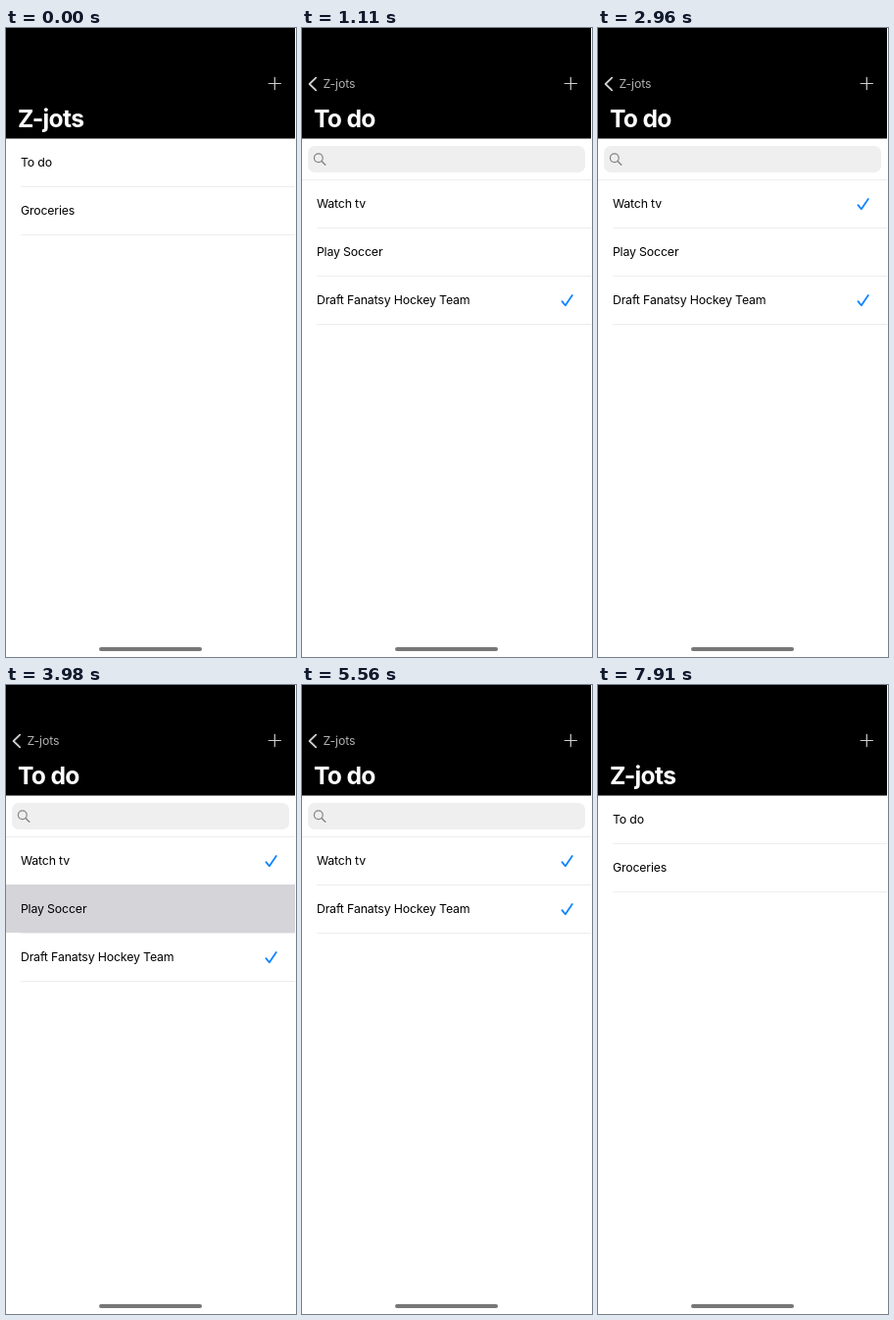
These frames come from a looping animation (296x640 px, 8 s). An HTML page with a canvas:

```html
<!DOCTYPE html>
<html lang="en">
<head>
<meta charset="utf-8">
<title>List app</title>
<style>
html, body { margin: 0; width: 100%; height: 100%; overflow: hidden; background: #fff; }
canvas { display: block; width: 296px; height: 640px; }
</style>
</head>
<body>
<canvas id="stage"></canvas>
<script>
const STAGE = 296, W = 295, H = 640, LOOP = 8000, HEAD = 112.5, ROW = 49;
const APP = 'Z-jots', LIST = 'To do';
const FAMILY = 'Inter, "Open Sans", sans-serif';
const BODY = 12.3, LARGE = 24.7;
const INK = '#000', LINE = '#ededed', SELECTED = '#d5d4d9', BLUE = '#0a84ff', RED = '#ff4f45';
const SOFT = '#b0b0b0', ICON = '#cfcfcf', GLASS = '#858588';

const TICKS = [0, 500, 620, 770, 890, 1000, 1110, 2710, 2960,
  3980, 4100, 4210, 4320, 4430, 4540, 4640, 4750,
  5340, 5450, 5560, 7190, 7340, 7450, 7560, 7680, 7790, 7910];

const canvas = document.getElementById('stage');
const ctx = canvas.getContext('2d');
const dpr = window.devicePixelRatio || 1;
canvas.width = STAGE * dpr;
canvas.height = H * dpr;

const clamp = v => Math.max(0, Math.min(1, v));
const lerp = (a, b, p) => a + (b - a) * p;
const smooth = v => { v = clamp(v); return v * v * (3 - 2 * v); };

// Critically damped spring: 1 at the start, settling to 0.
function spring(t, start) {
  const a = Math.max(0, t - start) * 0.01826;
  return (1 + a) * Math.exp(-a);
}

function rect(x, y, w, h, color) {
  ctx.fillStyle = color;
  ctx.fillRect(x, y, w, h);
}

function pill(x, y, w, h, r, color) {
  ctx.fillStyle = color;
  ctx.beginPath();
  ctx.roundRect(x, y, w, h, r);
  ctx.fill();
}

function trace(points) {
  ctx.beginPath();
  points.forEach(([x, y]) => ctx.lineTo(x, y));
}

function stroke(points, color, width) {
  ctx.strokeStyle = color;
  ctx.lineWidth = width;
  trace(points);
  ctx.stroke();
}

// y is the middle of the capital letters.
function text(str, x, y, { size = BODY, weight = 400, color = INK, track = -0.0115, align = 'left' } = {}) {
  ctx.font = `${weight} ${size}px ${FAMILY}`;
  ctx.letterSpacing = size * track + 'px';
  ctx.textAlign = align;
  ctx.fillStyle = color;
  ctx.fillText(str, x, y + size * 0.364);
}

const title = (str, x, y, size = LARGE) =>
  text(str, x, y, { size, weight: 700, color: '#fff', track: -0.029 });

function group(draw, { x = 0, y = 0, alpha = 1, clip } = {}) {
  ctx.save();
  ctx.globalAlpha *= alpha;
  if (clip) {
    ctx.beginPath();
    ctx.rect(...clip);
    ctx.clip();
  }
  ctx.translate(x, y);
  draw();
  ctx.restore();
}

function row(y, label, { checked = false, glow = 0 } = {}) {
  rect(0, y, W, ROW, '#fff');
  rect(15, y + ROW - 1, W - 15, 1, LINE);
  if (glow) group(() => rect(0, y - 1, W, ROW, SELECTED), { alpha: glow });
  text(label, 14.9, y + 23.9);
  if (checked) stroke([[265.4, y + 25.1], [268.8, y + 29.2], [275.8, y + 18.9]], BLUE, 1.8);
}

function trash(x, y) {
  stroke([[x - 7, y + 3.2], [x + 7, y + 3.2]], '#fff', 1.8);
  stroke([[x - 2.8, y + 2.8], [x - 2.2, y + 0.8], [x + 2.2, y + 0.8], [x + 2.8, y + 2.8]], '#fff', 1.5);
  ctx.fillStyle = '#fff';
  trace([[x - 6.6, y + 5], [x + 6.6, y + 5], [x + 5.4, y + 21], [x - 5.4, y + 21]]);
  ctx.fill();
  for (const d of [-2.9, 0, 2.9]) {
    stroke([[x + d, y + 7.5], [x + d * 0.85, y + 18.3]], RED, 1);
  }
}

function deleteButton(x, y) {
  rect(x, y - 1, W - x, ROW, RED);
  trash(x + 28, y + 4);
  text('Delete', x + 28, y + 37.3, { size: 11.1, weight: 600, color: '#fff', track: 0, align: 'center' });
}

function search() {
  pill(6, 120, 283, 27, 7, '#efefef');
  ctx.strokeStyle = GLASS;
  ctx.lineWidth = 1.2;
  ctx.beginPath();
  ctx.arc(16.8, 132.2, 4.4, 0, 7);
  ctx.stroke();
  stroke([[20, 135.4], [23.8, 139.2]], GLASS, 1.4);
}

function home(t) {
  const glow = t < 500 ? 0 : t < 7340 ? 1 : clamp(1 - (t - 7340) / 480);
  rect(0, HEAD, W, H, '#fff');
  row(113, LIST, { glow });
  row(113 + ROW, 'Groceries');
}

function detail(t) {
  const top = 155, second = top + ROW, third = second + ROW;
  const last = 'Draft Fanatsy Hockey Team';
  rect(0, HEAD, W, H, '#fff');
  search();
  rect(0, top - 1, W, 1, LINE);
  row(top, 'Watch tv', { checked: t >= 2960, glow: t >= 2710 && t < 2960 ? 1 : 0 });

  if (t >= 5560) return row(second, last, { checked: true });
  const swipe = 56 * smooth((t - 4060) / 650);
  const glow = t >= 3980 && t < 4100 ? 1 : 0;
  group(() => row(second, 'Play Soccer', { glow }), { x: -swipe });
  if (swipe) deleteButton(W - swipe, second);
  row(lerp(second, third, spring(t, 5300)), last, { checked: true });
}

// p: 1 on the home list, 0 on the detail list.
function header(t, p) {
  rect(0, 0, W, HEAD, '#000');
  const x = lerp(21.5, 12, p), y = lerp(57, 91.8, p), size = lerp(BODY, LARGE, p);
  const pressed = t >= 7190 && t < 7340;
  group(() => text(APP, x, y, { size, color: SOFT }), { alpha: (1 - p) * (pressed ? 0.33 : 1) });
  group(() => title(APP, x, y, size), { alpha: p });
  group(() => stroke([[14.2, 50.6], [7.6, 57], [14.2, 63.4]], ICON, 1.8),
    { x: 50 * p, y: 34 * p, alpha: clamp(1 - p * 10) * (pressed ? 0.4 : 1) });
  title(LIST, 12 + W * p, 91.8);
  stroke([[268.2, 56.5], [280.4, 56.5]], ICON, 1.2);
  stroke([[274.3, 50.4], [274.3, 62.6]], ICON, 1.2);
}

function pageShift(t) {
  if (t < 620 || t >= 7910) return 1;
  if (t < 1110) return spring(t, 551);
  return t < 7340 ? 0 : 1 - spring(t, 7320);
}

function draw(t) {
  const p = pageShift(t);
  ctx.setTransform(dpr, 0, 0, dpr, 0, 0);
  ctx.lineCap = ctx.lineJoin = 'round';
  rect(0, 0, STAGE, H, '#fff');
  group(() => {
    if (p > 0) {
      group(() => home(t), { x: -0.3 * W * (1 - p) });
      rect(0, HEAD, W, H, `rgba(0,0,0,${0.08 * (1 - p)})`);
    }
    if (p < 1) group(() => detail(t), { x: W * p });
    header(t, p);
    pill(95, 630, 105, 4, 2, '#777');
  }, { clip: [0, 0, W, H] });
}

const start = performance.now();

function frame() {
  const t = (performance.now() - start) % LOOP;
  draw(TICKS.findLast(tick => tick <= t));
  requestAnimationFrame(frame);
}

frame();
</script>
</body>
</html>
```
